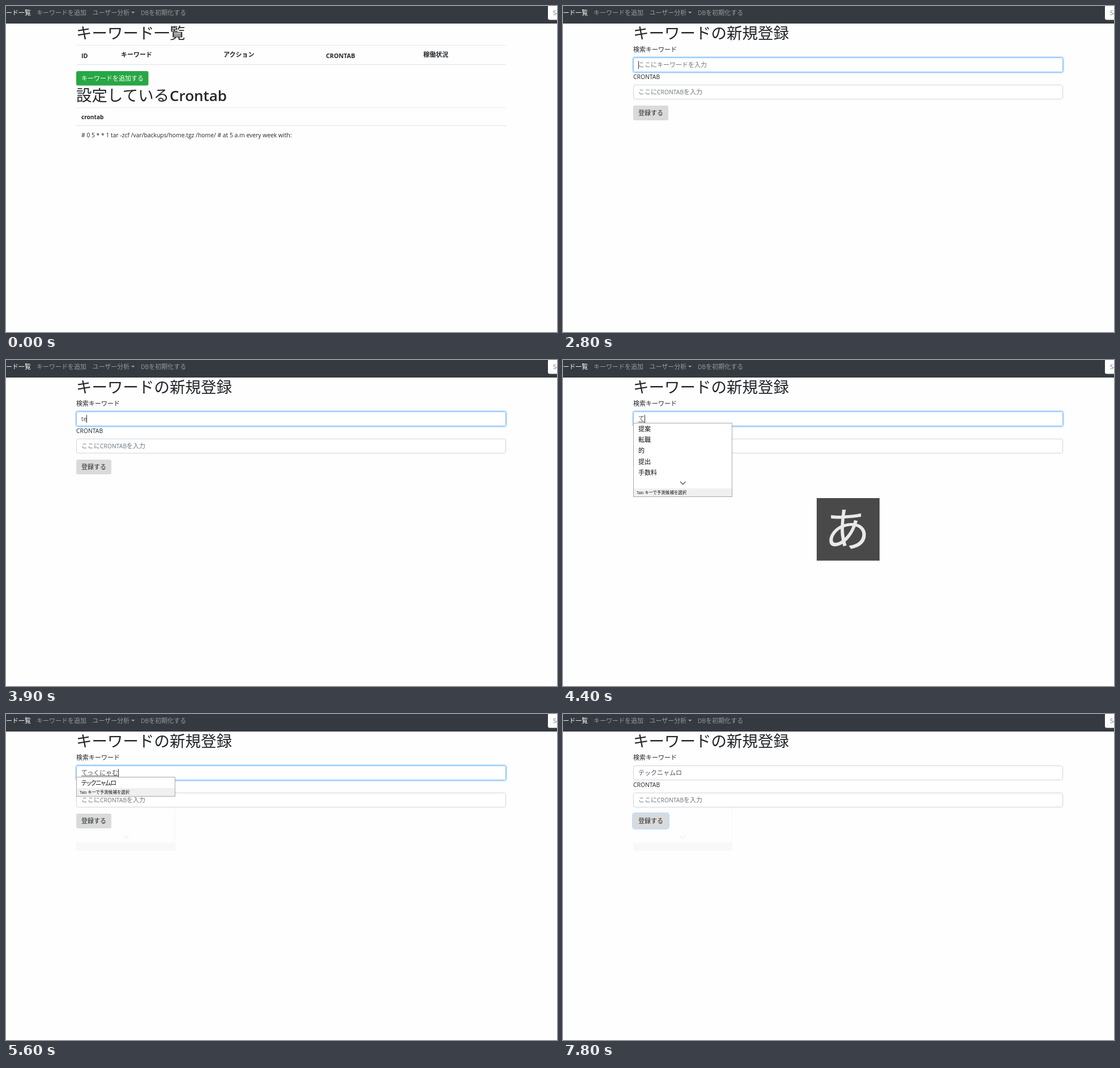
An HTML page for the animation above (8000 ms loop, 973x576 px).

```html
<!DOCTYPE html>
<html lang="ja">
<head>
<meta charset="utf-8">
<style>
html, body { margin: 0; width: 100%; height: 100%; overflow: hidden; background: #fefefe; }
svg { display: block; }
text { white-space: pre; font: 11px "Noto Sans CJK JP", "Noto Sans CJK", sans-serif; }
.latin { font-family: "Open Sans", "Noto Sans", sans-serif; }
.ui { font-feature-settings: "palt"; }
.tight { letter-spacing: -.1em; }
</style>
</head>
<body>
<svg id="stage" width="973" height="576" viewBox="0 0 973 576"></svg>
<script>
const LOOP = 8000, STEP = 100;
const INK = '#212529', VALUE = '#495057', HINT = '#6c757d';
const stage = document.getElementById('stage');

// Value of the last [time, value] entry already reached.
const at = (track, t) => track.reduce((v, [start, next]) => t >= start ? next : v, track[0][1]);

const WORD = 'テックニャムロ';
const VALUES = [
  [0, ''], [3000, 't'], [3200, 'te'], [3300, 'tek'], [3400, 'tekk'], [3900, 'te'], [4000, ''],
  [4400, 'て'], [4600, 'てｋ'], [4700, 'てっｋ'], [4800, 'てっく'],
  [5100, 'てっくｎ'], [5300, 'てっくｎｙ'], [5400, 'てっくにゃ'], [5500, 'てっくにゃｍ'],
  [5600, 'てっくにゃむ'], [5800, 'てっくにゃむｒ'], [5900, 'てっくにゃむろ'], [6100, WORD]
];
const CARET = [[0, 0], [1800, 1], [2300, 0], [2800, 1], [6600, 0], [7100, 1], [7600, 0]];
const INPUT_FOCUS = [[0, 0], [1800, .5], [1900, 1], [7600, .6], [7700, .3], [7800, 0]];
const BUTTON_FOCUS = [[0, 0], [7600, .4], [7700, .7], [7800, 1]];
const TILE = [
  [0, 0], [3000, .95], [3400, .62], [3500, .02], [3900, 0],
  [4400, .95], [4600, .75], [4700, .35], [4800, .02], [5300, 0]
];
const FIRST_LIST = ['提案', '転職', '的', '提出', '手数料'];
const SECOND_LIST = [WORD, 'テック', 'テックサヨミネ', 'テックヒヅル', 'テックヌマオカ'];

function text(x, y, str, { size = 11, fill = INK, weight = 400, latin = .943, cls = '', id = '', anchor = 'start' } = {}) {
  const body = str.replace(/[\x20-\x7e]+/g, run =>
    `<tspan class="latin" style="font-size:${size * latin}px">${run}</tspan>`);
  return `<text id="${id}" class="${cls}" x="${x}" y="${y}" fill="${fill}" text-anchor="${anchor}"
    style="font-size:${size}px;font-weight:${weight}">${body}</text>`;
}

const rect = (x, y, w, h, fill, extra = '') =>
  `<rect x="${x}" y="${y}" width="${w}" height="${h}" fill="${fill}" ${extra}/>`;

const ring = (x, y, w, h, alpha) => alpha
  ? rect(x - 1, y - 1, w + 2, h + 2, 'none', `rx="4" stroke="#bfdeff" stroke-width="2" opacity="${alpha}"`) : '';

const heading = (y, str) => text(124, y, str, { size: 27.5 });

function navbar() {
  const dim = { fill: '#999c9f' };
  return rect(0, 0, 973, 31, '#343a40') +
    text(-33, 16, 'キーワード一覧', { fill: '#fff' }) +
    text(54, 16, 'キーワードを追加', dim) +
    text(152.5, 16, 'ユーザー分析', dim) +
    '<path d="M221 10h6.5l-3.25 3.3z" fill="#999c9f"/>' +
    text(238, 16, 'DBを初期化する', dim) +
    rect(957, -1, 40, 25.5, '#fff', 'rx="3"') +
    text(966, 16, 'Search', { fill: HINT });
}

function listPage(t) {
  const pressed = t >= 1100;
  const bold = { weight: 700, latin: .98 };
  const rule = (y, color) => rect(124, y, 759, 1, color);
  return heading(58, 'キーワード一覧') +
    rule(69, '#e8ebee') + rule(103, '#dee2e6') +
    text(133, 91.5, 'ID', bold) + text(203, 89.5, 'キーワード', bold) +
    text(384, 89.5, 'アクション', bold) + text(565, 91.5, 'CRONTAB', bold) +
    text(737, 89.5, '稼働状況', bold) +
    (pressed ? ring(124, 115, 127.5, 25.5, .5) : '') +
    rect(124, 115, 127.5, 25.5, pressed ? '#218838' : '#28a745', 'rx="3"') +
    text(133, 132, 'キーワードを追加する', { fill: '#fff' }) +
    heading(168, '設定している') +
    text(289, 168, 'Crontab', { size: 26, latin: 1, weight: 600 }) +
    rule(179, '#e8ebee') + rule(211, '#dee2e6') +
    text(133, 200, 'crontab', { weight: 700, latin: .92 }) +
    text(133, 232, '# 0 5 * * 1 tar -zcf /var/backups/home.tgz /home/ # at 5 a.m every week with:');
}

function input(y, focus) {
  return ring(124, y, 759, 26, focus) +
    rect(124.5, y + .5, 758, 25, '#fff', `rx="3" stroke="${focus ? '#80bdff' : '#ced4da'}"`);
}

const chevron = color =>
  `<path d="M207 215l4.7 4.7l4.7 -4.7" fill="none" stroke="${color}" stroke-width="1.1"/>`;

function popup(items) {
  const full = items.length > 1;
  const bottom = full ? 241 : 145;
  return rect(124.5, 111.5, 174, bottom - 111, '#fff', 'stroke="#a8a8a8"') +
    items.map((item, i) => text(133, 126 + i * 19.2, item,
      { fill: '#111', cls: /^テ/.test(item) ? 'ui tight' : '' })).join('') +
    (full ? chevron('#444') : '') +
    rect(125, bottom - 14, 173, 14, '#f0f0f0') +
    text(130, bottom - 4, 'Tab キーで予測候補を選択', { size: 7.6, fill: '#111', cls: 'ui', latin: 1 });
}

const popupGhost = () =>
  rect(124, 227, 175, 14.5, '#f8f8f8') + rect(298, 145, 1, 82, '#f6f6f6') + chevron('#ececec');

// The letter fades faster than its tile.
function modeTile(t) {
  const alpha = at(TILE, t);
  if (!alpha) return '';
  const style = { latin: 1, fill: '#f2f2f2', anchor: 'middle' };
  const letter = t < 4400
    ? text(504, 337, 'A', { ...style, size: 99, weight: 300 })
    : text(502, 328.5, 'あ', { ...style, size: 81 });
  return `<g opacity="${alpha}">${rect(448, 244, 111, 110.5, '#404040')}<g opacity="${alpha}">${letter}</g></g>`;
}

function formPage(t) {
  const value = at(VALUES, t);
  const candidates = t < 4400 || t >= 6100 ? null
    : t < 4700 ? FIRST_LIST
    : t < 5400 ? SECOND_LIST : [WORD];
  return heading(58, 'キーワードの新規登録') +
    (t >= 5400 ? popupGhost() : '') +
    text(124, 81, '検索キーワード') +
    input(91, at(INPUT_FOCUS, t)) +
    (value ? '' : text(133, 108, 'ここにキーワードを入力', { fill: HINT })) +
    text(133, 108, value, { fill: VALUE, id: 'value' }) +
    text(124, 129, 'CRONTAB') +
    input(139, 0) +
    text(133, 156, 'ここにCRONTABを入力', { fill: HINT }) +
    ring(124, 176, 62, 26, at(BUTTON_FOCUS, t)) +
    rect(124, 176, 62, 26, '#dadada', 'rx="3"') +
    text(133, 193, '登録する') +
    (candidates ? popup(candidates) : '') +
    modeTile(t);
}

function addCaret(t) {
  const width = document.getElementById('value').getComputedTextLength();
  const composing = t >= 4400 && t < 6100;
  let marks = '';
  if (composing) marks += rect(133, 109, width, 1, VALUE);
  if (at(CARET, t)) marks += rect(Math.round(133 + width), 97, 1, 14, '#333');
  stage.insertAdjacentHTML('beforeend', marks);
}

function render(t) {
  const onForm = t >= 1200;
  stage.innerHTML = navbar() + (onForm ? formPage(t) : listPage(t));
  if (onForm) addCaret(t);
}

const start = performance.now();
let shown = -1;
function tick() {
  const step = Math.floor((performance.now() - start) % LOOP / STEP);
  if (step !== shown) render((shown = step) * STEP);
  requestAnimationFrame(tick);
}
tick();
</script>
</body>
</html>
```
